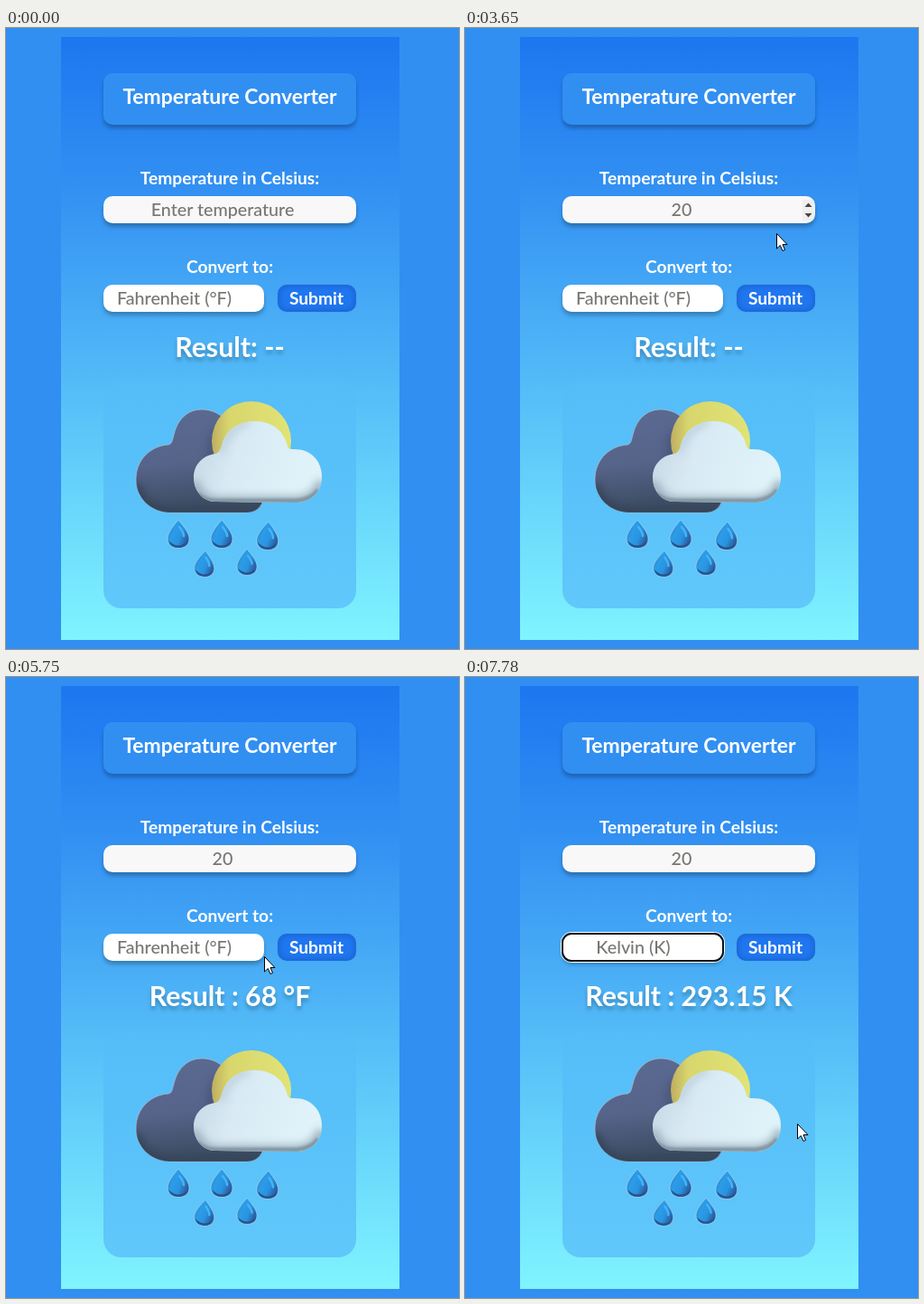
An HTML page that plays this animation: 502x687 px, repeating every 8 s.

```html
<!DOCTYPE html>
<html lang="en">
<head>
<meta charset="utf-8">
<title>Temperature Converter</title>
<style>
  html, body { margin: 0; width: 100%; height: 100%; overflow: hidden; background: #318ff2; }
  svg { display: block; width: 100vw; height: 100vh; }
  text { font: 700 19.2px Lato, "Open Sans", sans-serif; fill: #fff; text-anchor: middle; }
  text.field { font-weight: 500; font-size: 19.7px; fill: #767672; }
  text.title { font-size: 22.9px; }
  text.result { font-size: 30.3px; filter: drop-shadow(0 4px 2px rgba(0, 0, 0, .25)); }
  .raised { filter: drop-shadow(0 4px 2px rgba(0, 0, 0, .25)); }
  .popup { filter: drop-shadow(0 14px 15px rgba(15, 60, 120, .45)); }
  .soft { filter: blur(4px); }
</style>
</head>
<body>
<svg viewBox="0 0 502 687">
  <defs>
    <linearGradient id="sky" x2="0" y2="1">
      <stop stop-color="#1c77f0"/><stop offset=".25" stop-color="#3290f2"/><stop offset="1" stop-color="#80f4ff"/>
    </linearGradient>
    <linearGradient id="panel" x2="0" y2="1">
      <stop stop-color="#54bcf8"/><stop offset="1" stop-color="#60c8fa"/>
    </linearGradient>
    <linearGradient id="storm" x2=".15" y2="1">
      <stop stop-color="#5b6a92"/><stop offset=".55" stop-color="#56648a"/><stop offset="1" stop-color="#3b4b61"/>
    </linearGradient>
    <linearGradient id="mist" x2="1" y2=".2">
      <stop stop-color="#c3d5e2"/><stop offset=".4" stop-color="#d9eaf4"/><stop offset="1" stop-color="#dff3f9"/>
    </linearGradient>
    <linearGradient id="sun" x2="1" y2="0">
      <stop stop-color="#bfae62"/><stop offset=".22" stop-color="#d8d66c"/><stop offset="1" stop-color="#e1e375"/>
    </linearGradient>
    <linearGradient id="water" x2="1" y2=".5">
      <stop stop-color="#3a73b2"/><stop offset=".4" stop-color="#2a9de8"/><stop offset=".7" stop-color="#2a93e0"/><stop offset="1" stop-color="#2a5fa3"/>
    </linearGradient>
    <path id="darkCloud" d="M182 536C158 535 144 518 144 499C144 477 161 462 180 461C184 460 184 457 186 450C190 433 201 422 217 422C236 422 250 436 252 455L286 520Q282 536 266 536Z"/>
    <path id="lightCloud" d="M232 524C217 524 208 511 208 497C208 484 217 473 232 471C236 470 238 466 239 462C243 445 257 435 276 435C296 435 309 447 312 463C313 466 316 466 320 466C338 466 350 479 350 496C350 513 338 525 322 525Z"/>
    <g id="drop">
      <path d="M0-16C4-11 12-2 12 5C12 12 7 15.500 0 15.500S-12 12-12 5C-12-2-4-11 0-16Z" fill="url(#water)" stroke="#bcd9ee" stroke-width=".6"/>
      <path d="M-11 7Q0 18 11 7Q8.500 15 0 15T-11 7Z" fill="#2a5288"/>
      <path d="M1-8Q6-2 6 2" fill="none" stroke="#45b4f5" stroke-width="2.500" stroke-linecap="round"/>
    </g>
    <clipPath id="darkClip"><use href="#darkCloud"/></clipPath>
    <clipPath id="lightClip"><use href="#lightCloud"/></clipPath>
    <clipPath id="inputClip"><rect x="108" y="186" width="280" height="30" rx="10"/></clipPath>
  </defs>

  <rect x="61" y="10" width="375" height="667" fill="url(#sky)"/>
  <rect class="raised" x="108" y="50" width="280" height="57" rx="10" fill="#318ff2"/>
  <text class="title" x="248" y="84">Temperature Converter</text>

  <text x="248" y="173">Temperature in Celsius:</text>
  <rect class="raised" x="108" y="186" width="280" height="30" rx="10" fill="#f8f8f8"/>
  <text class="field" id="input" x="240" y="208"></text>
  <g id="spinner" clip-path="url(#inputClip)">
    <rect x="374" y="190" width="13" height="23" fill="#efefef"/>
    <path d="M376.500 198L380.500 193.500L384.500 198ZM376.500 205L380.500 209.500L384.500 205Z" fill="#454545"/>
  </g>
  <rect id="caret" y="189" width="1" height="24" fill="#555"/>

  <text x="248" y="271">Convert to:</text>
  <rect class="raised" x="108" y="284" width="178" height="30" rx="10" fill="#fff"/>
  <g id="ring" fill="none">
    <rect x="106.500" y="282.500" width="181" height="33" rx="11" stroke="#fff"/>
    <rect x="108" y="284" width="178" height="30" rx="10" stroke="#101010" stroke-width="2"/>
  </g>
  <text class="field" id="unit" x="186.500" y="306"></text>

  <rect x="301" y="284" width="87" height="30" rx="10" fill="#1c69d9"/>
  <rect x="304" y="287" width="81" height="24" rx="8" fill="#1f76ef" style="filter:blur(2px)"/>
  <text x="344" y="306">Submit</text>
  <text class="result" id="result" x="248" y="364"></text>

  <rect x="108" y="392" width="280" height="250" rx="20" fill="url(#panel)"/>
  <use href="#darkCloud" fill="url(#storm)" stroke="#a9b9cd" stroke-width=".8"/>
  <g clip-path="url(#darkClip)">
    <path class="soft" d="M143 505Q150 535 182 537H290" fill="none" stroke="#354458" stroke-width="12"/>
    <ellipse class="soft" cx="232" cy="470" rx="10" ry="26" fill="#414e6d" opacity=".5"/>
  </g>
  <circle cx="272" cy="457" r="44" fill="url(#sun)"/>
  <use href="#lightCloud" fill="url(#mist)"/>
  <g clip-path="url(#lightClip)" fill="none">
    <path class="soft" d="M206 502Q212 525 234 526H322Q346 524 352 502" stroke="#a3b6c3" stroke-width="17"/>
    <path d="M212 515Q220 523 234 523H322Q338 522 346 511" stroke="#8497a3" stroke-width="5" style="filter:blur(1px)"/>
    <path class="soft" d="M238 470Q244 442 270 436" stroke="#bdd0dd" stroke-width="7"/>
  </g>
  <g id="rain"></g>

  <g id="menu" class="popup">
    <rect x="109" y="315" width="176" height="64" rx="4" fill="#fff"/>
    <path id="highlight" d="M109 315H285V347H109Z" fill="#1967d2"/>
    <text class="field option" x="196" y="338">Fahrenheit (°F)</text>
    <text class="field option" x="196" y="370">Kelvin (K)</text>
    <rect x="109.500" y="315.500" width="175" height="63.500" rx="4" fill="none" stroke="#8a8f98" stroke-width=".7"/>
  </g>

  <g id="cursor" stroke="#000" fill="#fff" stroke-linejoin="round">
    <path id="arrow" d="M.5.5V17L4.300 13.500L7 19.500L9.500 18.400L7 12.500H12Z"/>
    <path id="hand" d="M-1.500 11V2Q-1.500 .5 .2 .5T2 2V8Q2 6.500 3.500 6.500T5 8.300Q5.200 7.200 6.500 7.200T8 9Q8.300 8 9.400 8.200T10.500 10V15Q10.500 18 8.700 20V23H-.5V20.500Q-3 17.500-5.500 13.500Q-6.300 11.800-5 11T-1.500 13Z"/>
    <path id="beam" fill="none" d="M-4-7.500H-1L0-6.500L1-7.500H4M0-6.500V6.500M-4 7.500H-1L0 6.500L1 7.500H4M-2 1.500H2"/>
  </g>
</svg>
<script>
const LOOP = 8000;
const $ = id => document.getElementById(id);
const show = (id, visible) => $(id).style.display = visible ? "" : "none";
const setText = (id, value) => { if ($(id).textContent !== value) $(id).textContent = value; };

// Pointer stops: time, x, y
const stops = [
  [440, 222, 641], [860, 206, 330], [1030, 190, 218], [1120, 196, 203],
  [1390, 196, 203], [1430, 187, 203], [1490, 197, 204],
  [1680, 197, 204], [1770, 345, 227],
  [3650, 345, 227], [3800, 350, 248], [4100, 344, 297], [4220, 348, 298],
  [5210, 348, 298], [5290, 350, 314],
  [5620, 350, 314], [5750, 286, 309], [6080, 208, 302],
  [6430, 208, 302], [6800, 234, 364],
  [7330, 234, 364], [7780, 368, 494]
];
const drops = [[191, 560, 0], [239, 560, 0], [290, 562, 3], [220, 593, 4], [267, 591, 0]];
$("rain").innerHTML = drops.map(([x, y, turn], i) =>
  `<use href="#drop" transform="translate(${x} ${y}) rotate(${turn}) scale(${i < 3 ? 1 : .92})"/>`).join("");

function pointerAt(t) {
  const next = stops.findIndex(stop => stop[0] > t);
  if (next < 0) return stops.at(-1).slice(1);
  const [t0, x0, y0] = stops[Math.max(0, next - 1)], [t1, x1, y1] = stops[next];
  const p = t1 > t0 ? (t - t0) / (t1 - t0) : 0;
  const k = p * p * (3 - 2 * p);
  return [x0 + (x1 - x0) * k, y0 + (y1 - y0) * k];
}

const inside = (x, y, left, top, right, bottom) => x >= left && x < right && y >= top && y < bottom;

function pointerShape(x, y, menuOpen) {
  if (menuOpen) return "arrow";
  if (inside(x, y, 301, 284, 388, 314)) return "hand";
  const overText = inside(x, y, 108, 186, 374, 216) || inside(x, y, 200, 255, 295, 276) ||
    inside(x, y, 184, 338, 311, 370);
  return overText ? "beam" : "arrow";
}

function draw(t) {
  const within = (from, to) => t >= from && t < to;
  const menuOpen = within(6190, 7130);
  const kelvin = t >= 7130;
  const [x, y] = pointerAt(t);

  setText("input", t < 2610 ? "Enter temperature" : t < 2890 ? "2" : "20");
  setText("unit", kelvin ? "Kelvin (K)" : "Fahrenheit (°F)");
  setText("result", kelvin ? "Result : 293.15 K" : t >= 4880 ? "Result : 68 °F" : "Result: --");

  show("spinner", within(1030, 4750));
  show("caret", within(1420, 1950) || within(2480, 3420) || within(3890, 4420));
  $("caret").setAttribute("x", t < 2610 ? 240 : t < 2890 ? 246 : 251);
  show("ring", t >= 6190);
  show("menu", menuOpen);

  const choice = y >= 347 ? 1 : 0;
  $("highlight").setAttribute("transform", `translate(0 ${choice * 32})`);
  document.querySelectorAll(".option").forEach((option, i) => option.style.fill = i === choice ? "#fff" : "");

  show("cursor", t >= 440);
  $("cursor").setAttribute("transform", `translate(${Math.round(x)} ${Math.round(y)})`);
  const shape = pointerShape(x, y, menuOpen);
  for (const id of ["arrow", "hand", "beam"]) show(id, id === shape);
}

const start = performance.now();
function tick() {
  draw((performance.now() - start) % LOOP);
  requestAnimationFrame(tick);
}
tick();
</script>
</body>
</html>
```
